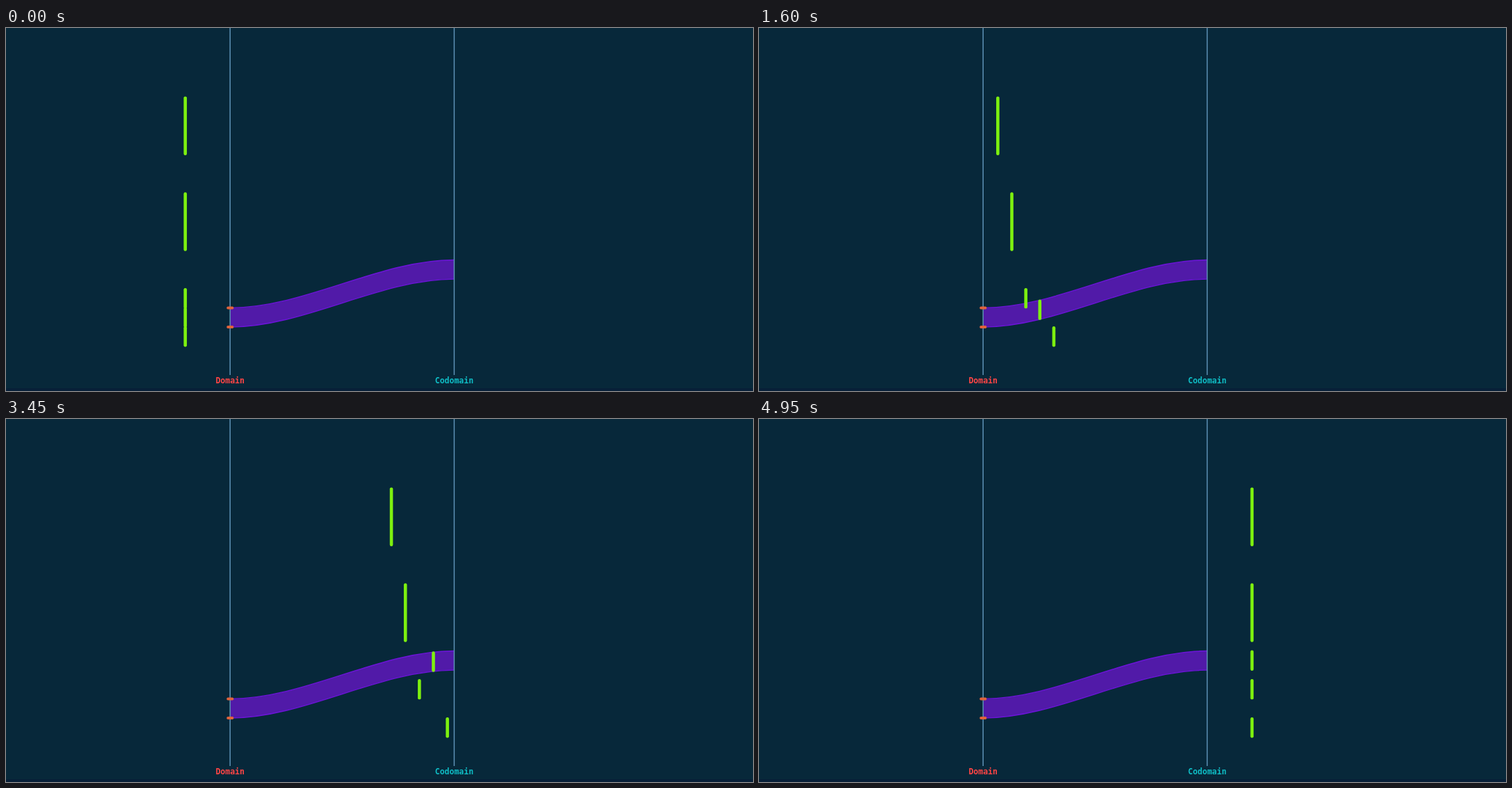
Recreate the animation shown at these times as an HTML page. Size 1074 px wide and 522 px high, loop 5000 ms.

```html
<!DOCTYPE html>
<html lang="en">
<head>
<meta charset="utf-8">
<title>Domain to codomain</title>
<style>
  html, body { margin: 0; width: 100%; height: 100%; overflow: hidden; background: #07283a; }
  svg { display: block; width: 100%; height: 100%; }
  text { font: bold 11.5px "DejaVu Sans Mono", monospace; text-anchor: middle; }
  .axis { stroke: #5d91b5; stroke-width: 1.5; }
  .tick { stroke: #e0633c; stroke-width: 4; stroke-linecap: round; }
  .band { fill: #511aa8; }
  .edge { fill: none; stroke: #6c14d8; stroke-width: 1.4; }
  #bars { fill: #7df00f; }
</style>
</head>
<body>
<svg viewBox="0 0 1074 522">
  <rect y="518" width="1074" height="4" fill="#071f38"/>
  <path class="band" d="M322.2 402.4C429.6 402.4 537 333.5 644.4 333.5V361.1C537 361.1 429.6 430 322.2 430Z"/>
  <path class="edge" d="M322.2 402.4C429.6 402.4 537 333.5 644.4 333.5M322.2 430C429.6 430 537 361.1 644.4 361.1"/>
  <path class="axis" d="M322.2 0V499M644.4 0V499"/>
  <g id="bars"></g>
  <path class="tick" d="M319.2 402.4H325.4M319.2 430H325.4"/>
  <text x="322.2" y="511" fill="#ff4545">Domain</text>
  <text x="644.4" y="511" fill="#0fbcc4">Codomain</text>
</svg>
<script>
const LOOP = 5000, STEP = 50, PHASE = 4950 / 7;
const LEFT = 322.2, SPAN = 322.2, MARGIN = 64.44;
const UNIT = 27.56, RISE = 2.5 * UNIT;

// Pieces in order of departure: top edge, length in units, vertical travel
const pieces = [
  { y: 430, units: 1, rise: 0 },
  { y: 402.4, units: 1, rise: RISE },
  { y: 374.9, units: 1, rise: 0 },
  { y: 237.1, units: 3, rise: 0 },
  { y: 99.3, units: 3, rise: 0 }
];

const clamp = v => Math.max(0, Math.min(1, v));
const smooth = u => u * u * (3 - 2 * u);

for (const p of pieces) {
  p.el = document.createElementNS("http://www.w3.org/2000/svg", "rect");
  const attrs = { x: -2.3, y: -0.9, width: 4.6, height: p.units * UNIT + 1.8, rx: 2.2 };
  for (const key in attrs) p.el.setAttribute(key, attrs[key]);
  document.getElementById("bars").append(p.el);
}

function draw(now) {
  const t = Math.floor(now % LOOP / STEP) * STEP / PHASE;
  const enter = clamp(t), leave = clamp(t - 6);
  pieces.forEach((p, i) => {
    const cross = clamp((t - 1 - i / 4) / 4);
    const x = LEFT + MARGIN * (enter - 1 + leave) + SPAN * cross;
    const y = p.y - p.rise * smooth(cross);
    p.el.setAttribute("transform", `translate(${x} ${y})`);
  });
  requestAnimationFrame(draw);
}
draw(0);
</script>
</body>
</html>
```
